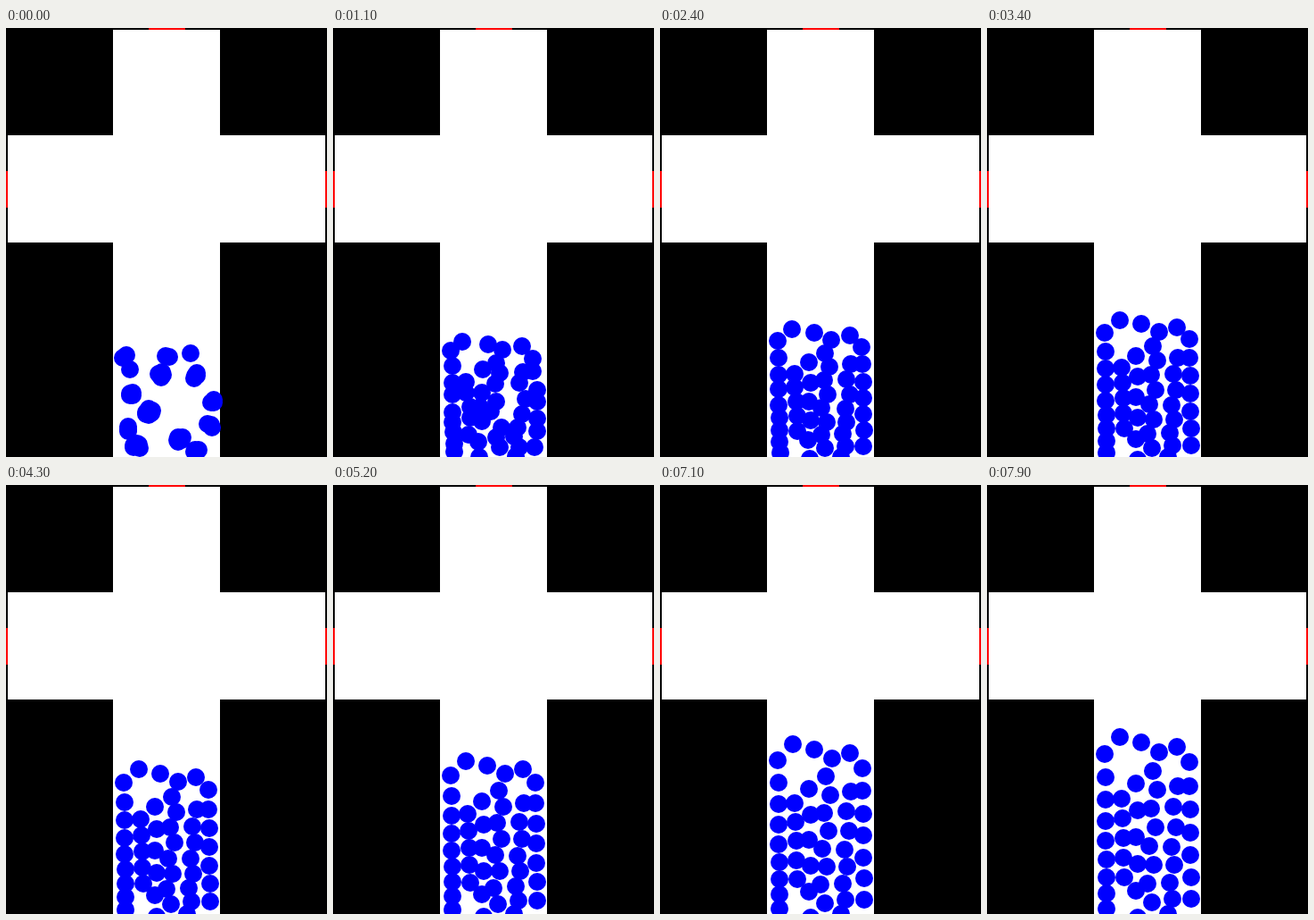
These frames come from a looping animation (360 px wide and 480 px high, 8 s). An HTML page with a canvas:

```html
<!DOCTYPE html>
<html lang="en">
<head>
<meta charset="utf-8">
<title>Crowd in a crossing</title>
<style>
html, body { margin: 0; width: 100%; height: 100%; overflow: hidden; background: #000; }
canvas { display: block; width: 360px; height: 480px; }
</style>
</head>
<body>
<canvas id="stage" width="360" height="480"></canvas>
<script>
const ctx = document.getElementById('stage').getContext('2d');
const LOOP = 8000, STEP = 100, END = 7900;
const RADIUS = 10, FLOOR = 480;
const SPREAD = 0.00005;   // share of the height above the floor gained per ms
const SETTLE = 800;       // time in which the clumps loosen
const PULL = 0.8;         // how tightly the clumps hold at the start

// Files of walkers: each leans or zigzags, and its gaps shrink downwards.
const files = [
  { x: 132.5, y: 301, lean: 0.2, zigzag: 0, gap: 27, squeeze: 0.67, count: 9 },
  { x: 151, y: 351, lean: 0.8, zigzag: 0, gap: 22, squeeze: 0, count: 5 },
  { x: 168, y: 334, lean: 0, zigzag: -1, gap: 30, squeeze: 0, count: 6 },
  { x: 190, y: 299, lean: -1, zigzag: 3, gap: 21, squeeze: 0, count: 9 },
  { x: 212, y: 337, lean: -1, zigzag: 2, gap: 24, squeeze: 0.5, count: 8 },
  { x: 227, y: 310, lean: 0.3, zigzag: 0, gap: 27, squeeze: 0.25, count: 7 }
];
const leaders = [[149, 282], [173, 288], [213, 293]];

const clumps = [
  [131, 368], [140, 381], [180, 368], [172, 386], [206, 363], [211, 388],
  [140, 410], [158, 430], [138, 450], [145, 467],
  [234, 418], [231, 445], [195, 461], [213, 473]
];

function heightAt(y, t) {
  return FLOOR - (FLOOR - y) * (1 - SPREAD * (END - t));
}

function walker(x, y) {
  const y0 = heightAt(y, 0);
  const distance = ([cx, cy]) => Math.hypot(cx - x, cy - y0);
  const clump = clumps.reduce((a, b) => distance(b) < distance(a) ? b : a);
  return { x, y, dx: (clump[0] - x) * PULL, dy: (clump[1] - y0) * PULL };
}

const crowd = leaders.map(([x, y]) => walker(x, y));
for (const f of files) {
  for (let k = 0; k < f.count; k++) {
    const side = k % 2 ? -1 : 1;
    crowd.push(walker(
      f.x + f.lean * k + f.zigzag * side,
      f.y + f.gap * k - f.squeeze * k * k
    ));
  }
}

function box(color, x, y, w, h) {
  ctx.fillStyle = color;
  ctx.fillRect(x, y, w, h);
}

function drawRoom() {
  box('#000', 0, 0, 360, 480);
  box('#fff', 120, 2, 120, 478);
  box('#fff', 2, 120, 356, 120);
  box('#f00', 160, 0, 41, 2);
  box('#f00', 0, 160, 2, 41);
  box('#f00', 358, 160, 2, 41);
}

function drawCrowd(t) {
  const hold = Math.exp(-t / SETTLE);
  ctx.fillStyle = '#00f';
  for (const w of crowd) {
    const x = Math.round(w.x + w.dx * hold);
    const y = Math.round(heightAt(w.y, t) + w.dy * hold);
    ctx.beginPath();
    ctx.arc(x, y, RADIUS, 0, Math.PI * 2);
    ctx.fill();
  }
}

function frame() {
  const t = Math.floor(performance.now() % LOOP / STEP) * STEP;
  drawRoom();
  drawCrowd(t);
  requestAnimationFrame(frame);
}
frame();
</script>
</body>
</html>
```
